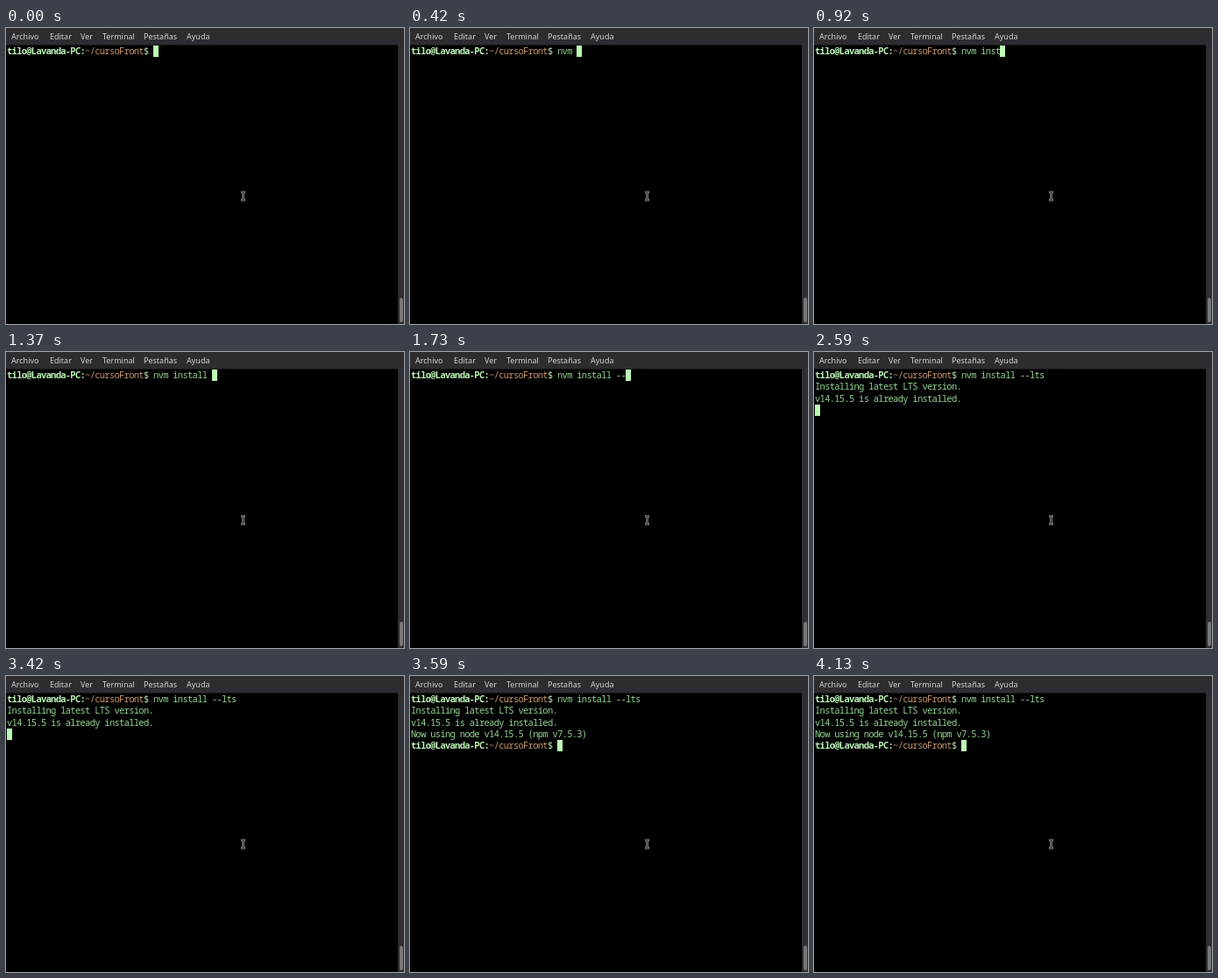
Animation, 454 px wide and 338 px high, one loop 4.39 s. Source, as an HTML page:

```html
<!DOCTYPE html>
<html lang="es">
<head>
<meta charset="utf-8">
<title>Terminal</title>
<style>
html, body { margin: 0; width: 100%; height: 100%; overflow: hidden; background: #000; }
#stage { position: absolute; left: 0; top: 0; width: 454px; height: 338px; overflow: hidden; }
#menu { position: absolute; left: 0; top: 0; width: 454px; height: 19px; background: #2d2c30; border-bottom: 1px solid #161618; }
#menu span {
  position: absolute; top: 0; line-height: 20.5px; color: #d2d1d3;
  font-family: "Noto Sans", "Open Sans", sans-serif; font-size: 9px; font-weight: 500;
}
#bar { position: absolute; left: 446.5px; top: 19px; width: 7.5px; height: 319px; background: #2f2e32; }
#thumb { position: absolute; left: 2px; top: 289px; width: 4.5px; height: 28px; border-radius: 2px; background: #777679; }
#screen {
  position: absolute; left: 1px; top: 20.3px; color: #94d492; white-space: pre;
  font-family: "Noto Sans Mono", "DejaVu Sans Mono", monospace; font-size: 10.5px;
  font-stretch: condensed; line-height: 13.6px;
}
#screen .line { position: absolute; left: 0; height: 13.2px; }
.host { font-weight: 600; color: #bdf3b8; }
.path { color: #c6976a; }
.sign { color: #b5dfa9; }
#caret { position: absolute; width: 6px; height: 13px; margin-left: -.2px; background: #bbfbb5; }
#mouse { position: absolute; left: 266px; top: 185px; }
</style>
</head>
<body>
<div id="stage">
  <div id="menu">
    <span style="left:6px">Archivo</span>
    <span style="left:50px">Editar</span>
    <span style="left:85px">Ver</span>
    <span style="left:110px">Terminal</span>
    <span style="left:157px">Pestañas</span>
    <span style="left:206px">Ayuda</span>
  </div>
  <div id="screen"></div>
  <div id="bar"><div id="thumb"></div></div>
  <svg id="mouse" width="10" height="14" fill="none">
    <path d="M2 2.5H7M4.5 2.5V11.5M2 11.5H7" stroke="#b8b8b8" stroke-width="2.2"/>
    <path d="M2.5 2.5H6.5M4.5 2.5V11.5M2.5 11.5H6.5" stroke="#222" stroke-width=".8"/>
  </svg>
</div>
<script>
const LOOP = 4390, CELL = 5.567, ROW = 13.2;
const COMMAND = "nvm install --lts";
const KEYS = [190, 270, 340, 420, 740, 800, 850, 910, 1000, 1090, 1180, 1260, 1480, 1640, 1780, 1840, 1940];
const ENTER = 2090, PROMPT = 3580, PROMPT_COLS = 30;
const OUTPUT = [
  [2150, "Installing latest LTS version."],
  [2380, "v14.15.5 is already installed."],
  [3440, "Now using node v14.15.5 (npm v7.5.3)"]
];

const screen = document.getElementById("screen");

function span(parent, text, name) {
  const el = document.createElement("span");
  el.className = name;
  el.textContent = text;
  parent.append(el);
  return el;
}

function line(row) {
  const el = document.createElement("div");
  el.className = "line";
  el.style.top = row * ROW + "px";
  screen.append(el);
  return el;
}

function prompt(row) {
  const el = line(row);
  span(el, "tilo@Lavanda-PC:", "host");
  span(el, "~/cursoFront", "path");
  span(el, "$ ", "sign");
  return el;
}

// Fit the font's own advance to the terminal grid.
const probe = span(screen, "0".repeat(40), "");
const advance = probe.getBoundingClientRect().width / 40;
probe.remove();
screen.style.letterSpacing = CELL - advance + "px";

const typed = span(prompt(0), "", "");
const output = OUTPUT.map(([, text], i) => span(line(i + 1), text, ""));
const lastPrompt = prompt(4);
const caret = document.createElement("div");
caret.id = "caret";
screen.append(caret);

const show = (el, on) => { el.style.visibility = on ? "visible" : "hidden"; };

function draw(t) {
  const count = KEYS.filter(k => k <= t).length;
  const printed = OUTPUT.filter(([at]) => at <= t).length;
  typed.textContent = COMMAND.slice(0, count);
  output.forEach((el, i) => show(el, i < printed));
  show(lastPrompt, t >= PROMPT);
  const row = t < ENTER ? 0 : printed + 1;
  const col = t < ENTER ? PROMPT_COLS + count : t >= PROMPT ? PROMPT_COLS : 0;
  caret.style.left = col * CELL + "px";
  caret.style.top = row * ROW + "px";
}

function tick() {
  draw(performance.now() % LOOP);
  requestAnimationFrame(tick);
}
tick();
</script>
</body>
</html>
```
